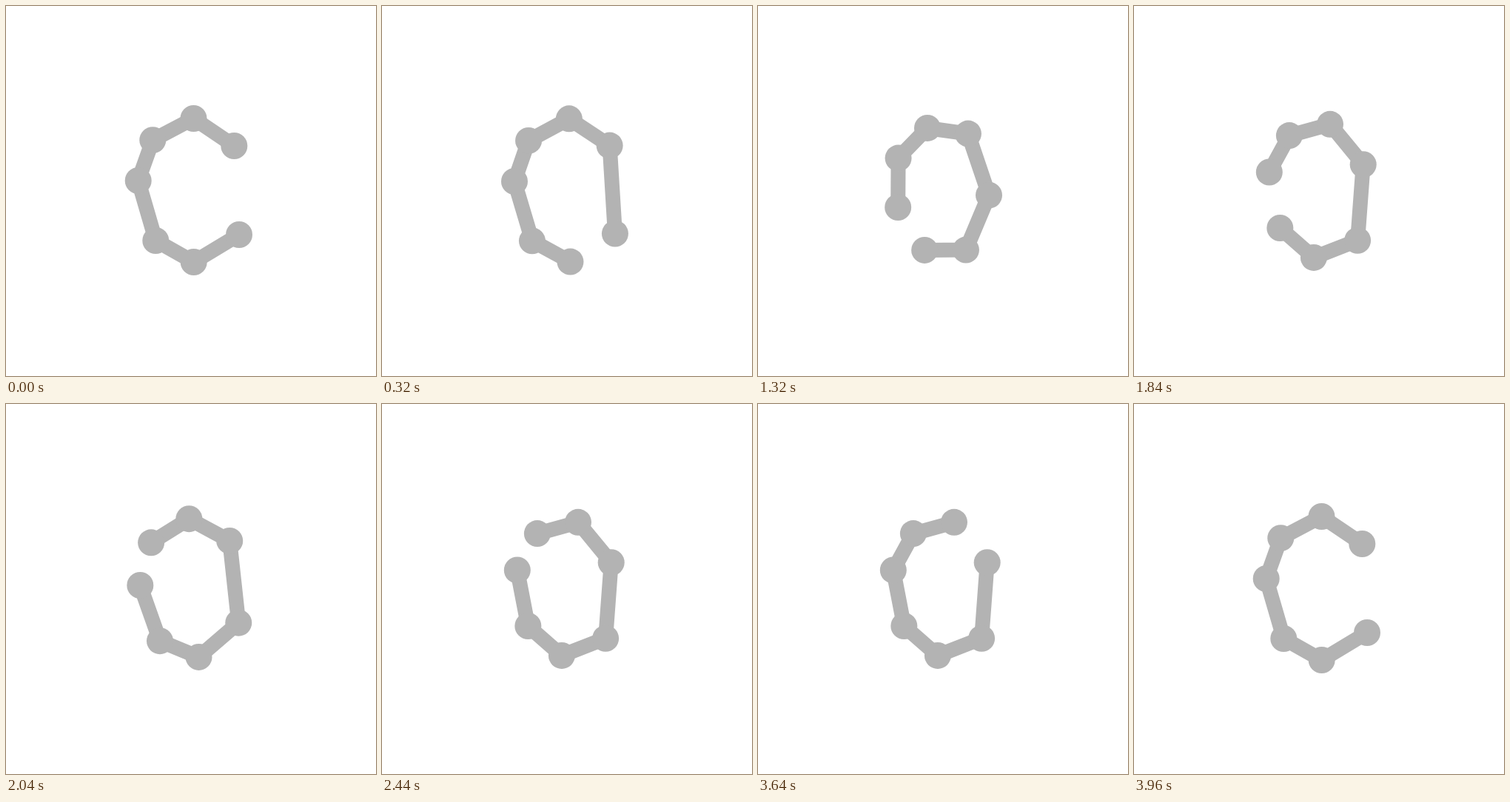
Animation of 500 by 500 pixels, one loop 4200 ms. Source, as an HTML page with a canvas:

```html
<!DOCTYPE html>
<html lang="en">
<head>
<meta charset="utf-8">
<title>Rotating chain</title>
<style>
  html, body { margin: 0; width: 100%; height: 100%; overflow: hidden; background: #fff; }
  canvas { display: block; width: 500px; height: 500px; }
</style>
</head>
<body>
<canvas id="stage" width="500" height="500"></canvas>
<script>
const ctx = document.getElementById('stage').getContext('2d');

// Resting places, clockwise from the top
const spots = [
  [253.5, 152], [308.3, 189], [315, 309], [253.7, 346],
  [202.3, 317], [178.7, 236], [198.3, 181.2]
];
const count = spots.length;
const turn = 600, step = 40, steps = 9;
const radius = 18, linkWidth = 20, color = '#b3b3b3';

const easeOut = p => 1 - (1 - p) ** 2;

// Each node slides in a straight line to the next spot
function nodeAt(i, p) {
  const [x0, y0] = spots[i % count];
  const [x1, y1] = spots[(i + 1) % count];
  return [x0 + (x1 - x0) * p, y0 + (y1 - y0) * p];
}

function draw(time) {
  const t = time % (turn * count);
  const shift = Math.floor(t / turn);
  const n = Math.min(steps, Math.floor((t % turn) / step));
  const p = easeOut(n / steps);

  // The open chain starts just after the gap
  const nodes = spots.map((_, i) => nodeAt(i + 2 + shift, p));

  ctx.fillStyle = '#fff';
  ctx.fillRect(0, 0, 500, 500);

  ctx.strokeStyle = ctx.fillStyle = color;
  ctx.lineWidth = linkWidth;
  ctx.lineJoin = 'round';
  ctx.beginPath();
  for (const [x, y] of nodes) ctx.lineTo(x, y);
  ctx.stroke();

  for (const [x, y] of nodes) {
    ctx.beginPath();
    ctx.arc(x, y, radius, 0, Math.PI * 2);
    ctx.fill();
  }
}

const start = performance.now();
function tick() {
  draw(performance.now() - start);
  requestAnimationFrame(tick);
}
tick();
</script>
</body>
</html>
```
